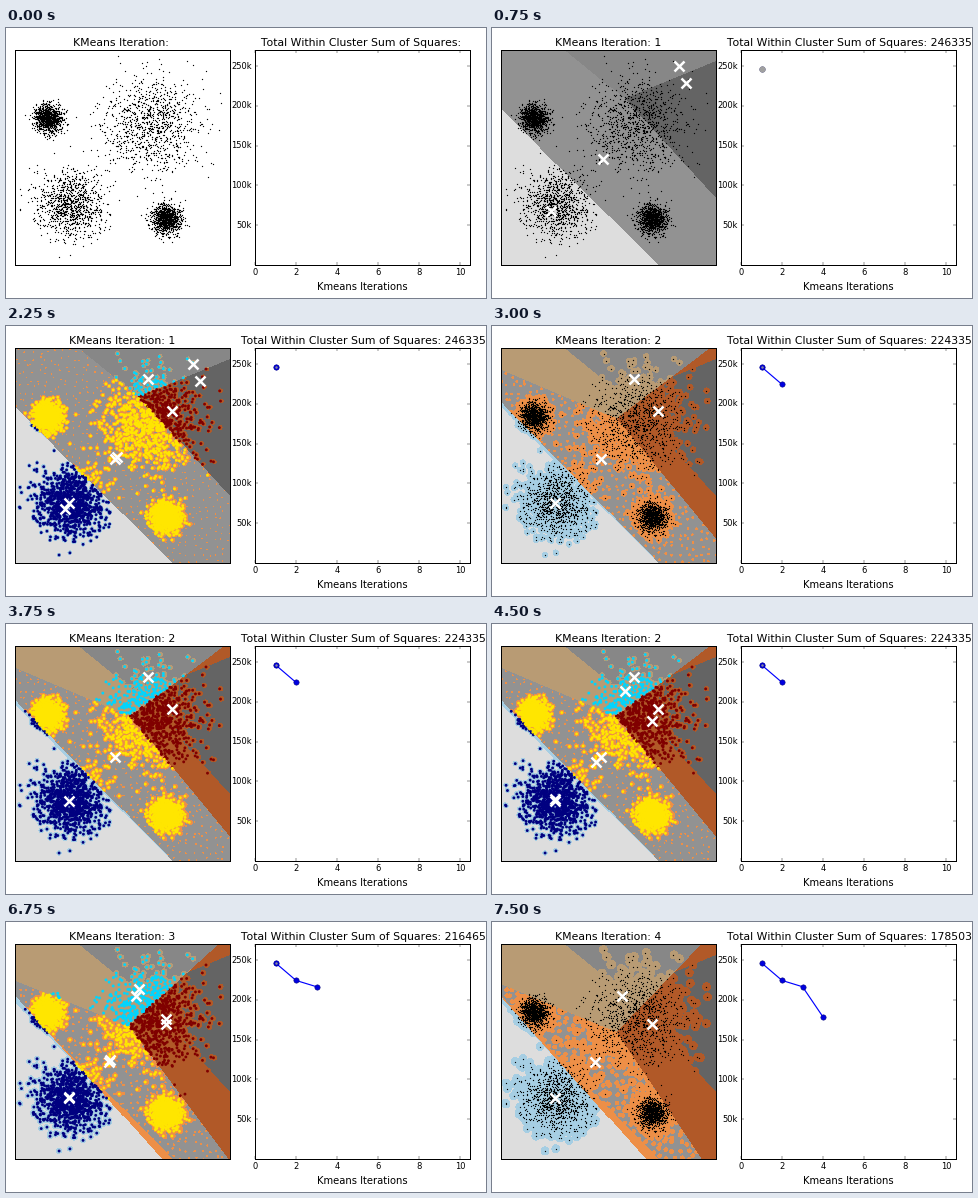
These frames come from a looping animation (480x270 px, 8 s). A matplotlib script:

```python
import numpy as np
import matplotlib.pyplot as plt
from matplotlib.animation import FuncAnimation
from matplotlib.colors import LinearSegmentedColormap

plt.rcParams.update({"text.kerning_factor": 6, "ytick.alignment": "center"})

W, H, DPI = 480, 270, 60
BOX = 215
LEFT, RIGHT, TOP = 9.1, 249.1, 22.1
PT = 72 / DPI  # points per pixel

# Clusters in order: blue, tan, orange, brown
scale = np.linspace(0, 1, 4)
paired = LinearSegmentedColormap.from_list("paired", plt.cm.Paired.colors)
FILLS = paired(scale)[:, :3]
DOTS = plt.cm.jet(scale)
GREYS = np.repeat([[0.867], [0.533], [0.576], [0.396]], 3, axis=1)

START = np.array([(59, 183), (187, 38), (111, 131), (194, 55)], float)
SCORES = [246335, 224335, 216465, 178503]

rng = np.random.default_rng(7)


def blob(x, y, sd, n=1000):
    return rng.normal((x, y), sd, (n, 2))


def nearest(xy, centers):
    gap = xy[..., None, :] - centers
    return (gap ** 2).sum(-1).argmin(-1)


def distance_to(pts):
    """Distance from each cell of the grid to the closest point."""
    rows = []
    for y in ys:
        near = pts[abs(pts[:, 1] - y) < 8]
        d = (xs[:, None] - near[:, 0]) ** 2 + (y - near[:, 1]) ** 2
        rows.append(d.min(axis=1, initial=64))
    return np.sqrt(rows)


points = np.vstack([blob(42, 91, 7), blob(160, 191, 7.3),
                    blob(65, 176, 16.5), blob(146, 97, 25)])
edge = np.array([LEFT, TOP]) + 4
points = points[((points > edge) & (points < edge + BOX - 8)).all(axis=1)]

xs = LEFT + 0.5 + np.arange(BOX)
ys = TOP + 0.5 + np.arange(BOX)
grid = np.stack(np.meshgrid(xs, ys), axis=-1)

# Run k-means, keeping every iteration
centers, owners, regions = [START], [], []
for _ in SCORES:
    owner = nearest(points, centers[-1])
    owners.append(owner)
    regions.append(nearest(grid, centers[-1]))
    centers.append(np.array([points[owner == c].mean(axis=0)
                             for c in range(4)]))

# Cells that have switched region by each iteration
moved = [np.zeros((BOX, BOX), bool)]
for old, new in zip(regions, regions[1:]):
    moved.append(moved[-1] | (old != new))

lattice = grid[3::7, 3::7].reshape(-1, 2)
specks = lattice + rng.uniform(-2.5, 2.5, lattice.shape)
point_dist = distance_to(points)
speck_dist = distance_to(specks)


def background(step):
    if step == 0:
        return np.ones((BOX, BOX, 3))
    k, phase = divmod(step - 1, 3)
    img = GREYS[regions[0]]
    if step > 1:
        halo = 2.4 + 0.3 * k if phase else 2.7 + 0.6 * k
        speck = 0.8 + 0.2 * k if phase else 0.9 + 0.5 * k
        spots = (speck_dist < speck) & (regions[0] == 2)
        tinted = moved[k] | (point_dist < halo) | spots
        img[tinted] = FILLS[regions[k]][tinted]
    return img


fig = plt.figure(figsize=(W / DPI, H / DPI), dpi=DPI, facecolor="white")


def panel(x):
    ax = fig.add_axes([x / W, 1 - (TOP + BOX) / H, BOX / W, BOX / H])
    for side in ax.spines.values():
        side.set_linewidth(PT)
    return ax


ax = panel(LEFT)
extent = (LEFT, LEFT + BOX, TOP + BOX, TOP)
image = ax.imshow(background(0), extent=extent, interpolation="nearest",
                  aspect="auto")
ax.set(xticks=[], yticks=[])
cloud = ax.scatter(*points.T, s=2.4, c="black", linewidths=0)
crosses, = ax.plot([], [], "x", color="white", ms=13, mew=3, zorder=5)
ax.set_xlim(extent[:2])
ax.set_ylim(extent[2:])

chart = panel(RIGHT)
chart.set_xlim(0, 10.5)
chart.set_ylim(0, 270000)
chart.set_xticks(range(0, 11, 2))
ticks = range(50000, 250001, 50000)
chart.set_yticks(ticks, [f"{t // 1000}k" for t in ticks])
chart.tick_params(direction="in", top=True, right=True, length=4, width=0.5,
                  pad=4, labelsize=10)
chart.set_xlabel("Kmeans Iterations", fontsize=12, labelpad=5)
curve, = chart.plot([], [], "-o", color="blue", lw=1.4, ms=6.4,
                    mfc=(0, 0, 0.88), mec=(0, 0, 0.45), mew=0.6)
first, = chart.plot([], [], "o", zorder=4)

left_title = ax.set_title("", fontsize=13, pad=5)
right_title = chart.set_title("", fontsize=13, pad=5)


def draw(i):
    step = i // 3
    k, phase = divmod(step - 1, 3)
    started = step > 0
    image.set_data(background(step))

    colored = started and phase > 0
    cloud.set_sizes([12 if colored else 2.4])
    cloud.set_facecolors(DOTS[owners[k]] if colored else "black")

    last = k + 2 if phase == 2 else k + 1
    shown = np.vstack(centers[k:last]) if started else START[:0]
    crosses.set_data(*shown.T)

    n = k + 1
    curve.set_data(range(1, n + 1), SCORES[:n])
    ring = started and n < len(SCORES)
    first.set_data([1] if ring else [], SCORES[:1] if ring else [])
    if step == 1:
        first.set(mfc="#a0a0a0", mec="#a0a0a0", ms=7, mew=0.6)
    else:
        first.set(mfc="#8888a0", mec="#0000c8", ms=4.8, mew=1.8)

    left_title.set_text(f"KMeans Iteration: {n if started else ''}")
    right_title.set_text("Total Within Cluster Sum of Squares: "
                         f"{SCORES[k] if started else ''}")
    return image, cloud, crosses, curve, first, left_title, right_title


anim = FuncAnimation(fig, draw, frames=32, interval=250, repeat=True,
                     repeat_delay=0, blit=False)
plt.show()
```
